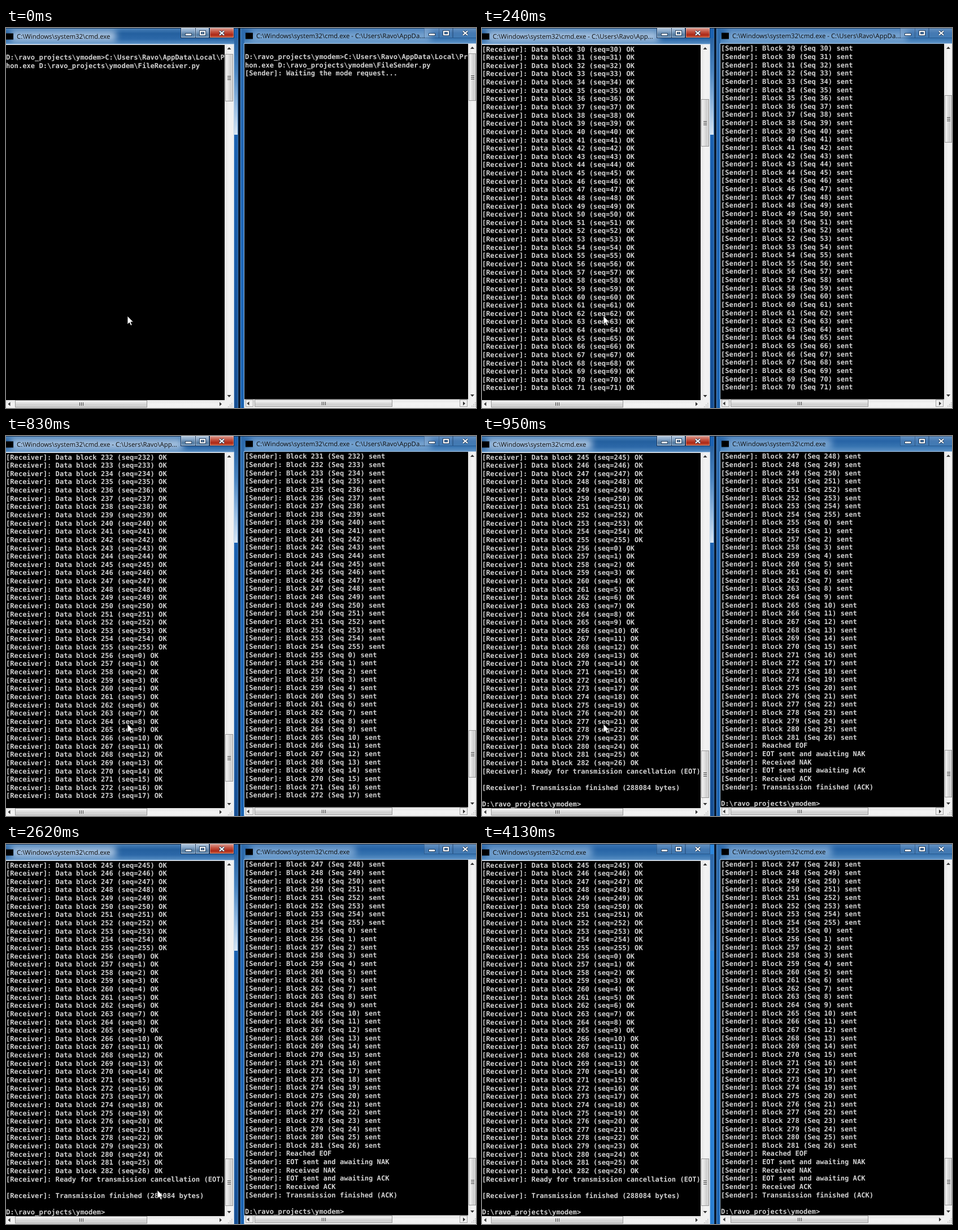
These frames come from a looping animation (832 px wide and 673 px high, 4.23 s). An HTML page with a canvas:

```html
<!DOCTYPE html>
<html lang="en">
<head>
<meta charset="utf-8">
<title>Ymodem transfer</title>
<style>
  html, body { margin: 0; width: 100%; height: 100%; overflow: hidden; background: #000; }
  canvas { display: block; }
</style>
</head>
<body>
<canvas id="stage" width="832" height="673"></canvas>
<script>
const ctx = document.getElementById('stage').getContext('2d');
const LOOP = 4230, PITCH = 14.63, CELL = 7.3, VISIBLE = 42;
const PROMPT = 'D:\\ravo_projects\\ymodem>';
const TITLE = 'C:\\Windows\\system32\\cmd.exe';
const LAUNCH = PROMPT + 'C:\\Users\\Ravo\\AppData\\Local\\Pr';

// Each list holds [start time, value]; a value holds until the next entry.
const RECEIVED = [[0, 0], [120, 31], [240, 71], [390, 118], [520, 164], [680, 218], [830, 273], [950, 282]];
const CARET = [[0, 0], [1720, 1], [2340, 0], [2740, 1], [3280, 0], [3820, 1], [4130, 0]];
const HOVER = [[0, 1], [3010, .75], [3140, .5], [3280, .25], [3430, 0]];
const MOUSE = [[0, [215, 510]], [2470, [216, 527]], [2620, [268, 613]], [2740, [353, 658]], [2860, null]];

const at = (steps, t) => steps.filter(s => s[0] <= t).pop()[1];
const range = (a, b, make) => Array.from({ length: Math.max(0, b - a + 1) }, (_, i) => make(a + i));
const receiverLine = n => `[Receiver]: Data block ${n} (seq=${n % 256}) OK`;
const senderLine = n => `[Sender]: Block ${n} (Seq ${(n + 1) % 256}) sent`;

function rect(x, y, w, h, fill) {
  ctx.fillStyle = fill;
  ctx.fillRect(x, y, w, h);
}

function frame(x, y, w, h, color) {
  ctx.strokeStyle = color;
  ctx.lineWidth = 1;
  ctx.strokeRect(x + .5, y + .5, w - 1, h - 1);
}

function gradient(x0, y0, x1, y1, ...stops) {
  const g = ctx.createLinearGradient(x0, y0, x1, y1);
  stops.forEach((c, i) => g.addColorStop(i / (stops.length - 1), c));
  return g;
}

function polygon(points, fill) {
  ctx.beginPath();
  points.forEach(([x, y]) => ctx.lineTo(x, y));
  ctx.closePath();
  ctx.fillStyle = fill;
  ctx.fill();
}

function arrow(x, y, dx, dy) {
  polygon([[x + 3 * dx, y + 3 * dy],
           [x - dx - 3.5 * dy, y - dy - 3.5 * dx],
           [x - dx + 3.5 * dy, y - dy + 3.5 * dx]], '#333');
}

function thumb(x, y, w, h) {
  const upright = h > w;
  rect(x, y, w, h, upright
    ? gradient(x, 0, x + w, 0, '#f6f6f6', '#e6e6e6', '#cfcfcf', '#dcdcdc')
    : gradient(0, y, 0, y + h, '#f6f6f6', '#e6e6e6', '#cfcfcf', '#dcdcdc'));
  frame(x, y, w, h, '#979797');
  const cx = Math.round(x + w / 2), cy = Math.round(y + h / 2);
  for (const d of [-3, 0, 3]) {
    if (upright) rect(cx - 3, cy + d, 6, 1, '#444');
    else rect(cx + d, cy - 3, 1, 6, '#444');
  }
}

function sizeGrip(x, y) {
  for (let i = 0; i < 3; i++)
    for (let j = 2 - i; j < 3; j++) rect(x + i * 3, y + j * 3, 1.5, 1.5, '#b4b4b4');
}

function verticalBar(x, y, bottom, w, thumbY) {
  rect(x, y, w, bottom - y, gradient(x, 0, x + w, 0, '#e6e6e6', '#f3f3f3', '#f0f0f0'));
  arrow(x + w / 2, y + 8, 0, -1);
  arrow(x + w / 2, bottom - 8, 0, 1);
  thumb(x + 1, Math.round(thumbY), w - 2, 84);
}

function horizontalBar(x, y, right, left, width, hover) {
  rect(x, y, right - x, 14, gradient(0, y, 0, y + 14, '#e6e6e6', '#f3f3f3', '#f0f0f0'));
  ctx.globalAlpha = hover;
  for (const bx of [x + 2, right - 15]) {
    rect(bx, y, 14, 13, '#eee');
    frame(bx, y, 14, 13, '#a2a2a2');
  }
  ctx.globalAlpha = 1;
  arrow(x + 7.5, y + 7, -1, 0);
  arrow(right - 8, y + 7, 1, 0);
  thumb(left, y, width, 13);
}

function controls(x, active) {
  const line = active ? '#16355c' : 'rgba(20,50,90,.38)';
  const parts = [[0, 27], [26, 25], [51, 44]];
  parts.forEach(([dx, w], i) => {
    const red = i === 2;
    const fill = !active ? gradient(0, 0, 0, 18, 'rgba(255,255,255,.22)', 'rgba(255,255,255,.06)')
      : red ? gradient(0, 0, 0, 18, '#dd9d92', '#c75a48', '#ad2816', '#cf6541')
      : gradient(0, 0, 0, 18, '#b4c9df', '#86a6c8', '#52799f', '#7fa3c6');
    rect(x + dx, 0, w, 17, fill);
    frame(x + dx, -1, w, 19, line);
    if (active) frame(x + dx + 1, 0, w - 2, 17, 'rgba(255,255,255,.35)');
  });
  // dark underlay first, white glyph on top
  for (const [color, grow] of [['#26405f', 1], ['#fff', 0]]) {
    rect(x + 9 - grow, 10 - grow, 10 + 2 * grow, 3 + 2 * grow, color);
    ctx.strokeStyle = color;
    ctx.lineWidth = 2 + 2 * grow;
    ctx.strokeRect(x + 35, 6, 8, 6);
    ctx.beginPath();
    for (const s of [-1, 1]) {
      ctx.moveTo(x + 73 - 4 * s, 5.5);
      ctx.lineTo(x + 73 + 4 * s, 12.5);
    }
    ctx.stroke();
  }
}

function titleBar(x, right, height, textX, textY, title, active) {
  const colors = active ? ['#4a82bb', '#24609f', '#2c68a8', '#5a90c4'] : ['#3a75b4', '#2764a6', '#3673b0', '#5c91c5'];
  rect(x, 0, right - x, height, gradient(0, 0, 0, height, ...colors));
  ctx.font = '11.35px "Open Sans", "Noto Sans", sans-serif';
  const width = ctx.measureText(title).width;
  ctx.save();
  ctx.beginPath();
  ctx.rect(x, 0, right - x, height);
  ctx.clip();
  ctx.filter = 'blur(6px)';
  rect(textX - 10, textY - 14, width + 20, 20, active ? 'rgba(200,219,240,.78)' : 'rgba(180,209,239,.55)');
  ctx.restore();
  rect(textX - 19, textY - 9, 13, 11, '#000');
  ctx.fillStyle = '#0a0a0a';
  ctx.fillText(title, textX, textY);
}

function consoleText(x, y, w, h, lines) {
  rect(x, y, w, h, '#000');
  ctx.save();
  ctx.beginPath();
  ctx.rect(x, y, w, h);
  ctx.clip();
  ctx.font = 'bold 12.13px "DejaVu Sans Mono", "Liberation Mono", monospace';
  ctx.fillStyle = '#d2d2d2';
  lines.forEach((line, row) => ctx.fillText(line, x + (x ? 1 : 0), y + 11.6 + row * PITCH));
  ctx.restore();
}

// Scrolled log: header rows first, then numbered blocks filling the window.
function log(header, offset, last, line) {
  const rows = [...header];
  for (let n = 1; n <= last; n++) rows[n + offset] = line(n);
  return Array.from(rows, r => r || '').slice(Math.max(0, last + offset + 1 - VISIBLE));
}

function receiverLines(t, last) {
  if (t >= 950) return [...range(245, 282, receiverLine),
    '[Receiver]: Ready for transmission cancellation (EOT)', '',
    '[Receiver]: Transmission finished (288084 bytes)', '', PROMPT];
  return log(['', LAUNCH, 'hon.exe D:\\ravo_projects\\ymodem\\FileReceiver.py'], 10, last, receiverLine);
}

function senderLines(t, last) {
  if (t >= 950) return [...range(247, 281, senderLine),
    ...['Reached EOF', 'EOT sent and awaiting NAK', 'Received NAK', 'EOT sent and awaiting ACK',
      'Received ACK', 'Transmission finished (ACK)'].map(s => '[Sender]: ' + s), '', PROMPT];
  return log(['', LAUNCH, 'hon.exe D:\\ravo_projects\\ymodem\\FileSender.py',
    '[Sender]: Waiting the mode request...'], 9, last - 1, senderLine);
}

function borders(active) {
  rect(403, 0, 9, 673, active
    ? gradient(0, 190, 0, 673, '#1b62b2', '#1a5ba6', '#174f93')
    : gradient(0, 190, 0, 673, '#2c86dc', '#2a84da', '#2a7fd2'));
  rect(404, 18, 7, 171, active
    ? gradient(0, 18, 0, 189, '#2a64a3', '#4a84bf', '#8fb6de', '#d8e6f4')
    : gradient(0, 18, 0, 189, '#2f6aab', '#2f6fb6', '#3577c0', '#4288d0'));
  rect(403, 28, 1, 645, '#b9d4ee');
  rect(410, 0, 1, 673, active ? '#3f78b4' : '#3f8ad8');
  rect(411, 0, 4, 673, '#0a1c33');
  rect(415, 0, 7, 673, gradient(0, 0, 0, 673, '#2f6cac', '#1d63b2', '#1c66b8', '#1a62b0'));
  rect(415, 0, 1, 673, '#5f9bd6');
  rect(421, 27, 1, 646, '#9cc3e8');
}

function pointer(x, y) {
  const shape = [[0, 0], [0, 15], [3.4, 11.8], [5.8, 17], [8.2, 16], [5.9, 10.8], [10.5, 10.8]];
  polygon(shape.map(([dx, dy]) => [x + dx, y + dy]), '#fff');
  ctx.strokeStyle = '#000';
  ctx.lineWidth = .8;
  ctx.stroke();
}

function draw(t) {
  const last = at(RECEIVED, t), running = t < 950, active = t < 4130;
  const child = TITLE + ' - C:\\Users\\Ravo\\App';
  const leftThumb = running ? 46 + 1.99 * Math.max(0, last - 31) : 557;
  const rightThumb = running ? Math.max(45, 43 + 1.99 * (last - 33)) : 556;

  rect(0, 0, 832, 673, '#f0f0f0');
  borders(active);

  titleBar(0, 404, 29, 19, 18.5, running && t >= 120 ? child + '...' : TITLE, active);
  rect(0, 28, 404, 1, '#a9c8e8');
  rect(0, 0, 411, 1, '#16304f');
  controls(309, active);
  consoleText(0, 30, 387, 629, receiverLines(t, last));
  verticalBar(387, 29, 659, 16, leftThumb);
  horizontalBar(-1, 659, 387, 16, 234, 0);
  sizeGrip(393, 664);

  titleBar(422, 832, 27, 443, 17.5, running ? child + 'Da...' : TITLE, false);
  rect(421, 27, 411, 1, '#a9c8e8');
  rect(415, 0, 417, 1, '#16304f');
  controls(740, false);
  consoleText(422, 28.8, 396, 628.7, senderLines(t, last));
  rect(422, 28, 396, 1, '#000');
  verticalBar(818, 28, 658, 15, rightThumb);
  horizontalBar(422, 658, 818, 440, 244, at(HOVER, t));
  sizeGrip(824, 663);

  if (at(CARET, t)) rect(PROMPT.length * CELL, 655, 7, 3, '#dcdcdc');
  const mouse = at(MOUSE, t);
  if (mouse) pointer(...mouse);
}

ctx.textRendering = 'geometricPrecision';
const start = performance.now();
function tick() {
  draw((performance.now() - start) % LOOP);
  requestAnimationFrame(tick);
}
tick();
</script>
</body>
</html>
```
